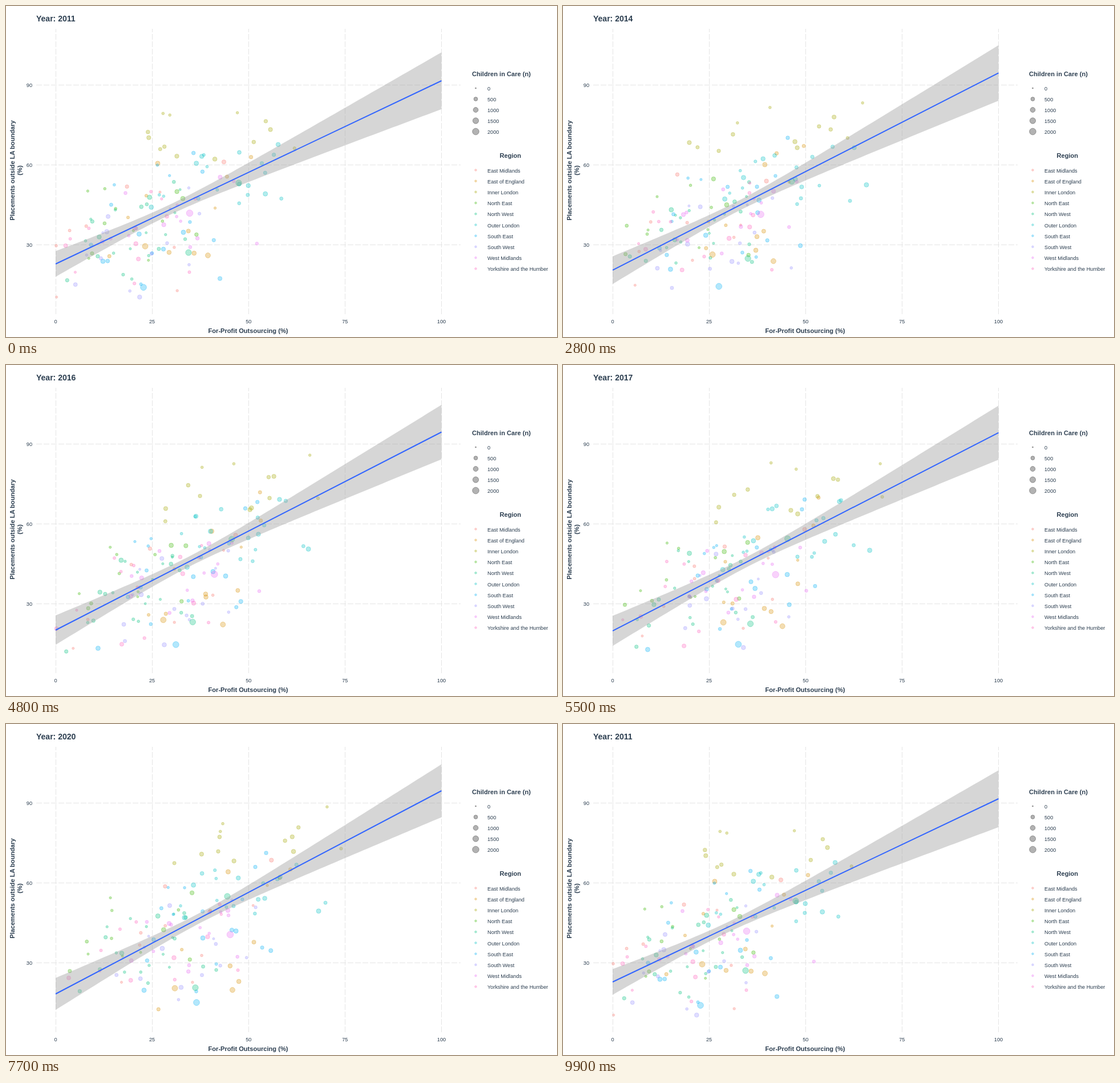
Write an HTML page that moves like this. It is 966x580 px and loops after 10 s.

```html
<!DOCTYPE html>
<html lang="en">
<head>
<meta charset="utf-8">
<title>Placements and outsourcing by year</title>
<style>
  html, body { margin: 0; width: 100%; height: 100%; overflow: hidden; background: #fff; }
  svg { display: block; width: 966px; height: 580px; }
  text { font: 9.2px "Liberation Sans", Arial, sans-serif; fill: #2c3e50; }
  .bold { font-size: 11.1px; font-weight: bold; }
  .heading { font-size: 14px; font-weight: bold; }
  .grid { stroke: #e5e5e5; stroke-dasharray: 10 3; shape-rendering: crispEdges; }
  .dot { fill-opacity: .3; stroke-opacity: .3; stroke-width: 1; }
</style>
</head>
<body>
<svg id="chart" viewBox="0 0 966 580"></svg>
<script>
const chart = document.getElementById('chart');
const FIRST_YEAR = 2011, YEARS = 12, LOOP = 10000, FRAME = 100;
const LEFT = 87, RIGHT = 763.5;

// Centre of each region's cloud in the first year, its later drift, and its spread.
const region = (name, color, count, center, drift, spread) =>
  ({ name, color, count, center, drift, spread });
const REGIONS = [
  region('East Midlands', '#f8766d', 9, [220, 398], [120, -30], [90, 65]),
  region('East of England', '#d89000', 10, [305, 350], [85, -10], [65, 70]),
  region('Inner London', '#a3a500', 13, [360, 222], [85, -20], [95, 32]),
  region('North East', '#39b600', 12, [220, 375], [5, -15], [70, 48]),
  region('North West', '#00bf7d', 22, [220, 390], [30, -5], [60, 48]),
  region('Outer London', '#00bfc4', 19, [390, 292], [35, -7], [78, 36]),
  region('South East', '#00b0f6', 18, [265, 360], [75, -25], [85, 72]),
  region('South West', '#9590ff', 15, [250, 410], [70, -25], [68, 58]),
  region('West Midlands', '#e76bf3', 13, [285, 365], [35, 0], [70, 45]),
  region('Yorkshire and the Humber', '#ff62bc', 13, [230, 395], [35, -10], [82, 52])
];

// The largest bubbles: region, radius, first and last position.
const BUBBLES = [
  ['North West', 5.2, [408, 310], [388, 302]],
  ['North West', 5.2, [320, 432], [332, 462]],
  ['South East', 5.4, [241, 493], [334, 488]],
  ['West Midlands', 5.8, [322, 363], [393, 369]],
  ['East of England', 5, [244, 421], [296, 463]],
  ['East of England', 4.5, [354, 437], [397, 466]]
];

// Height of the fitted line at both ends every two years; the last one lasts until the return.
const FIT = [[452, 131], [459, 123], [466, 113], [464, 119], [473, 117]];

function add(tag, attributes, content = '') {
  const node = document.createElementNS(chart.namespaceURI, tag);
  for (const [key, value] of Object.entries(attributes)) node.setAttribute(key, value);
  node.textContent = content;
  return chart.appendChild(node);
}
const label = (content, x, y, extra = {}) => add('text', { x, y, ...extra }, content);
const dot = (cx, cy, r, color) => add('circle', { class: 'dot', cx, cy, r, fill: color, stroke: color });
const mix = (a, b, u) => a + (b - a) * u;
const mixAll = (a, b, u) => a.map((value, i) => mix(value, b[i], u));

let seed = FIRST_YEAR;
function random() {
  seed = (Math.imul(seed, 1664525) + 1013904223) >>> 0;
  return seed / 2 ** 32;
}
const wobble = () => (random() + random() - 1) * .9;
// Even scatter over about -1.6 to 1.6 without clumps.
const scatter = (i, ratio) => ((i + .5) * ratio % 1 - .5) * 3.2;

const middle = { 'text-anchor': 'middle' }, bold = { class: 'bold' };

function drawAxes() {
  for (let percent = 0; percent <= 100; percent += 25) {
    const x = mix(LEFT, RIGHT, percent / 100);
    add('line', { class: 'grid', x1: x, x2: x, y1: 540, y2: 40 });
    label(percent, x, 556, middle);
  }
  for (let percent = 30; percent <= 90; percent += 30) {
    const y = 558.5 - 4.672 * percent;
    add('line', { class: 'grid', x1: 53, x2: 797, y1: y, y2: y });
    label(percent, 46, y + 4, { 'text-anchor': 'end' });
  }
  label('For-Profit Outsourcing (%)', 424.5, 573, { ...bold, ...middle });
  const upright = x => ({ ...bold, ...middle, transform: `translate(${x} 288) rotate(-90)` });
  label('Placements outside LA boundary', 0, 0, upright(15));
  label('(%)', 0, 0, upright(28));
}

function drawLegends() {
  label('Children in Care (n)', 817, 123, bold);
  for (let i = 0; i < 5; i++) {
    const y = 144 + 19 * i;
    dot(823.5, y, 1 + 2.4 * Math.sqrt(i), '#000');
    label(500 * i, 844, y + 4);
  }
  label('Region', 865.5, 266, bold);
  REGIONS.forEach(({ name, color }, i) => {
    const y = 287.5 + 19.2 * i;
    dot(823.5, y, 1.8, color);
    label(name, 844, y + 4);
  });
}

function makeCloud({ color, count, center, drift, spread }, index) {
  return Array.from({ length: count }, (_, i) => {
    const home = [scatter(i + index, .618), scatter(i + index, .755)];
    const yearly = Array.from({ length: YEARS }, () => home.map(value => value + wobble()));
    return { node: dot(0, 0, 2 + random() * 2, color), yearly, center, drift, spread };
  });
}

drawAxes();
drawLegends();
const heading = label('', 53, 27, { class: 'heading' });
const cloud = REGIONS.flatMap(makeCloud);
const bubbles = BUBBLES.map(([name, radius, from, to]) => {
  const { color } = REGIONS.find(item => item.name === name);
  return { node: dot(0, 0, radius, color), from, to };
});
const band = add('path', { fill: '#999', 'fill-opacity': .4 });
const line = add('path', { fill: 'none', stroke: '#36f', 'stroke-width': 2 });

// Each year moves in equal steps, then rests for one frame.
function yearsElapsed(ms) {
  let frames = Math.floor(ms % LOOP / FRAME), years = 0;
  for (let year = 0; year < YEARS; year++) {
    const steps = year < 5 ? 8 : year === 5 ? 6 : 7;
    years += Math.min(Math.max(frames, 0), steps) / steps;
    frames -= steps + 1;
  }
  return years;
}

function place(node, x, y) {
  node.setAttribute('cx', x.toFixed(2));
  node.setAttribute('cy', y.toFixed(2));
}

function fitEnds(years) {
  const last = FIT.at(-1);
  if (years > YEARS - 1) return mixAll(last, FIT[0], years - YEARS + 1);
  const i = Math.floor(years / 2);
  return mixAll(FIT[i] ?? last, FIT[i + 1] ?? last, years / 2 - i);
}

// The band is a hyperbola around the line, narrowest near the middle of the data.
function drawFit(years, progress) {
  const [startY, endY] = fitEnds(years);
  const waist = 9;
  const leftArm = mix(20.5, 26.5, progress), rightArm = mix(49, 45.5, progress);
  const upper = [], lower = [];
  for (let i = 0; i <= 79; i++) {
    const u = i / 79, x = mix(LEFT, RIGHT, u), y = mix(startY, endY, u);
    const half = Math.hypot(waist, mix(-leftArm, rightArm, u));
    upper.push([x, y - half]);
    lower.unshift([x, y + half]);
  }
  band.setAttribute('d', `M${upper.concat(lower).join('L')}Z`);
  line.setAttribute('d', `M${LEFT} ${startY}L${RIGHT} ${endY}`);
}

function render(ms) {
  const years = yearsElapsed(ms), year = Math.floor(years);
  const progress = Math.min(years / 9, YEARS - years, 1);
  heading.textContent = `Year: ${FIRST_YEAR + Math.ceil(years - .5) % YEARS}`;
  for (const { node, yearly, center, drift, spread } of cloud) {
    const [dx, dy] = mixAll(yearly[year % YEARS], yearly[(year + 1) % YEARS], years - year);
    const x = center[0] + drift[0] * progress + spread[0] * dx;
    const y = center[1] + drift[1] * progress + spread[1] * (.9 * dy - .3 * dx);
    place(node, Math.max(LEFT, x), Math.min(510, y));
  }
  for (const { node, from, to } of bubbles) place(node, ...mixAll(from, to, progress));
  drawFit(years, progress);
}

const start = performance.now();
function tick() {
  render(performance.now() - start);
  requestAnimationFrame(tick);
}
tick();
</script>
</body>
</html>
```
